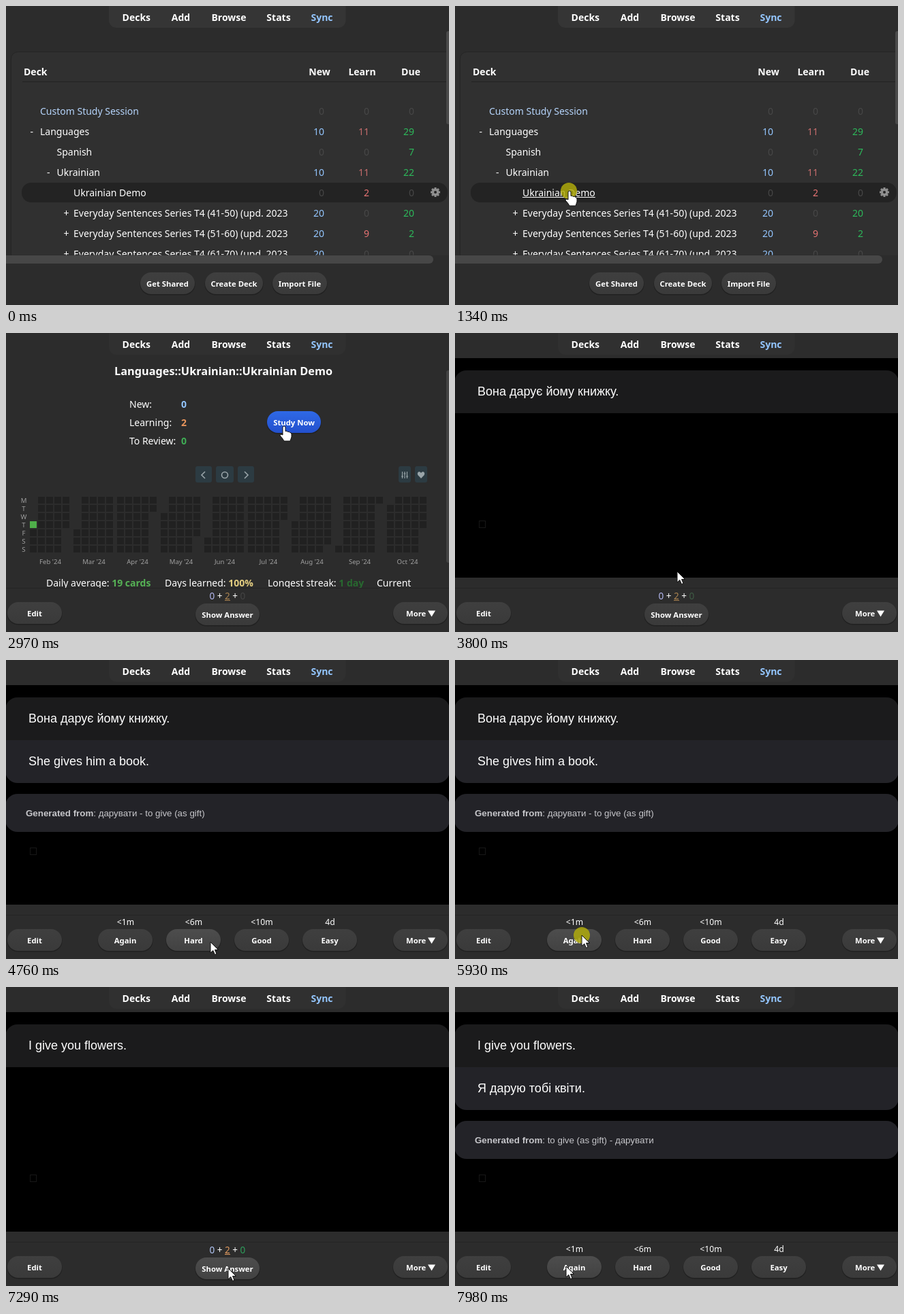
Animation of 650x440 px, one loop 8000 ms. Source, as an HTML page with a canvas:

```html
<!DOCTYPE html>
<html lang="en">
<head>
<meta charset="utf-8">
<title>Flashcard review</title>
<style>
  html, body { margin: 0; height: 100%; overflow: hidden; background: #2c2c2c; }
  canvas { display: block; }
</style>
</head>
<body>
<canvas id="stage" width="650" height="440"></canvas>
<script>
const g = document.getElementById('stage').getContext('2d');
const LOOP = 8000, STEP = 70;
const ui = (size, weight = 400) => `${weight} ${size}px "Noto Sans", "Open Sans", sans-serif`;
const arial = (size, weight = 400) => `${weight} ${size}px "Liberation Sans", Arial, sans-serif`;
const BODY = ui(14), BOLD = ui(14, 700), BUTTON = ui(11.3, 700);
const WHITE = '#fff', BLUE = '#93c5fd', RED = '#e57373', GREEN = '#2db85a', DIM = '#474747', BG = '#2c2c2c';

// Pointer moves: [start, steps, x, y]
const moves = [
  [120, 10, 167, 272], [1940, 10, 407, 137], [3520, 8, 301, 416], [4280, 2, 300, 415],
  [5040, 5, 187, 405], [5530, 1, 186, 405], [6260, 7, 323, 412], [6750, 2, 326, 414],
  [7430, 8, 165, 411], [7980, 1, 163, 411]
];
const clicks = [[1340, 1480], [2760, 2900], [4550, 4690], [5930, 6060], [7150, 7290]];
const cards = [
  { front: 'Вона дарує йому книжку.', back: 'She gives him a book.', note: 'дарувати - to give (as gift)',
    counts: ['#b4b8f0', '#ab8350', '#3f5c45'] },
  { front: 'I give you flowers.', back: 'Я дарую тобі квіти.', note: 'to give (as gift) - дарувати',
    counts: ['#b4c8f8', '#e09a60', '#2f9f5c'] }
];
// [name, indent, toggle, new, learn, due]
const decks = [
  ['Custom Study Session', 50, '', 0, 0, 0],
  ['Languages', 50, '-', 10, 11, 29],
  ['Spanish', 74.5, '', 0, 0, 7],
  ['Ukrainian', 74.5, '-', 10, 11, 22],
  ['Ukrainian Demo', 99, '', 0, 2, 0],
  ...['41-50', '51-60', '61-70'].map((part, i) =>
    [`Everyday Sentences Series T4 (${part}) (upd. 2023)`, 99, '+', 20, [0, 9, 0][i], [20, 2, 0][i]])
];

let pointer, hand;
const inside = (x, y, w, h) =>
  pointer && pointer.x >= x && pointer.x <= x + w && pointer.y >= y && pointer.y <= y + h;

function pointerAt(t) {
  if (t < moves[0][0]) return null;
  let x = 530, y = 416;
  for (const [start, steps, toX, toY] of moves) {
    if (t < start) break;
    const u = Math.min(1, (Math.floor((t - start) / STEP) + 1) / steps) ** 0.8;
    const e = u * u * (3 - 2 * u);
    x += (toX - x) * e;
    y += (toY - y) * e;
  }
  return { x: Math.round(x), y: Math.round(y) };
}

function text(str, x, y, color = WHITE, font = BODY, align = 'left') {
  g.font = font;
  g.fillStyle = color;
  g.textAlign = align;
  g.fillText(str, x, y);
  return g.measureText(str).width;
}

function runs(pieces, x, y) {
  for (const [str, color, font] of pieces) x += text(str, x, y, color, font);
}

function rect(x, y, w, h, color) {
  g.fillStyle = color;
  g.fillRect(x, y, w, h);
}

function box(x, y, w, h, radius, fill, stroke) {
  g.beginPath();
  g.roundRect(x, y, w, h, radius);
  g.fillStyle = fill;
  g.fill();
  if (stroke) { g.strokeStyle = stroke; g.lineWidth = 1; g.stroke(); }
}

function button(label, x, y, w, shades) {
  const [top, bottom] = shades || (inside(x, y, w, 32) ? ['#4d4d4d', '#424242'] : ['#3f3f3f', '#3a3a3a']);
  const fill = g.createLinearGradient(0, y, 0, y + 32);
  fill.addColorStop(0, top);
  fill.addColorStop(1, bottom);
  box(x - 0.5, y + 1, w + 1, 32.5, 16, '#212121');
  box(x, y, w, 32, 16, fill);
  text(label, x + w / 2, y + 20.5, WHITE, BUTTON, 'center');
}

function gear(x, y) {
  g.strokeStyle = '#8f8f8f';
  g.lineWidth = 3;
  g.beginPath();
  for (let i = 0; i < 8; i++) {
    const c = Math.cos(i * Math.PI / 4), s = Math.sin(i * Math.PI / 4);
    g.moveTo(x + c * 4, y + s * 4);
    g.lineTo(x + c * 7, y + s * 7);
  }
  g.stroke();
  g.lineWidth = 3.4;
  g.beginPath();
  g.arc(x, y, 3.7, 0, 7);
  g.stroke();
}

function toolbar(bright) {
  box(151, -12, 347.5, 44, 11, bright ? '#353535' : '#303030');
  [['Decks', 191.3], ['Add', 256.5], ['Browse', 327], ['Stats', 400], ['Sync', 463.5]].forEach(([label, x]) =>
    text(label, x, 22, label === 'Sync' ? BLUE : WHITE, BOLD, 'center'));
}

function deckRow([name, x, toggle, ...counts], i) {
  const y = 160 + i * 30, current = i === 4;
  if (current) box(23, 260, 625, 29, 14, '#232323');
  if (current || inside(23, y - 20, 627, 29)) gear(630, y - 6);
  if (toggle) text(toggle, x - 14.5, y);
  g.save();
  g.beginPath();
  g.rect(0, 0, 413, 440);
  g.clip();
  const color = i ? WHITE : '#b5d4fb', width = text(name, x, y, color);
  if (inside(x, y - 15, Math.min(width, 413 - x), 20)) {
    rect(x, y + 1, width, 1, color);
    hand = true;
  }
  g.restore();
  counts.forEach((n, k) => {
    const color = n ? [BLUE, n === 11 ? '#c76d6d' : RED, GREEN][k] : DIM;
    text(n, 467 + 66 * k, y, color, BODY, 'right');
  });
}

function deckList() {
  g.save();
  g.beginPath();
  g.rect(0, 37, 650, 329.5);
  g.clip();
  box(7.5, 67.5, 670, 400, 10, '#303030', '#252525');
  text('Deck', 26, 102, WHITE, BOLD);
  [['New', 460], ['Learn', 522.5], ['Due', 594]].forEach(([label, x]) => text(label, x, 102, WHITE, BOLD, 'center'));
  rect(24, 111, 624, 1, '#222');
  decks.forEach(deckRow);
  box(646, 37, 8, 137, 3, '#4a4a4a');
  g.restore();
  box(-10, 367, 637, 12, 6, '#474747');
  button('Get Shared', 197, 392, 80);
  button('Create Deck', 292, 392, 85);
  button('Import File', 391, 392, 80);
}

function heatmap() {
  [...'MTWTFSS'].forEach((day, i) => text(day, 26, 249.5 + i * 12, '#a0a0a0', ui(9.6), 'center'));
  let left = 35;
  for (let month = 1; month <= 9; month++) {
    const first = (new Date(2024, month, 1).getDay() + 6) % 7;
    const days = new Date(2024, month + 1, 0).getDate();
    const columns = Math.ceil((first + days) / 7);
    for (let d = first; d < first + days; d++) {
      const today = month === 1 && d === first;
      rect(left + Math.floor(d / 7) * 12, 241 + d % 7 * 12, 10, 10, today ? '#4fae4a' : '#212121');
    }
    const label = ['Feb', 'Mar', 'Apr', 'May', 'Jun', 'Jul', 'Aug', 'Sep', 'Oct'][month - 1];
    text(`${label} '24`, left + columns * 6, 340, '#a0a0a0', ui(9.6), 'center');
    left += columns * 12 + 4;
  }
}

function heatmapButtons() {
  [[278, 24], [308, 26], [340, 24], [576, 18], [600, 18]].forEach(([x, w]) => box(x, 196, w, 24, 3, '#2c3b42'));
  g.strokeStyle = g.fillStyle = '#9aa5a9';
  g.lineWidth = 1.6;
  g.stroke(new Path2D('M292 204l-5 5 5 5M350 204l5 5-5 5M325.5 209a4.5 4.5 0 1 1-9 0a4.5 4.5 0 1 1 9 0'));
  g.lineWidth = 1.1;
  g.stroke(new Path2D('M581.5 204v10M585 204v10M588.5 204v10M580 211h3M583.5 207h3M587 211h3'));
  g.fill(new Path2D('M609 214l-4.5-4.7C602 205 607 202.5 609 206C611 202.5 616 205 613.5 209.3Z'));
}

function overview() {
  text('Languages::Ukrainian::Ukrainian Demo', 319, 62, WHITE, ui(16.3, 700), 'center');
  [['New:', 0, BLUE], ['Learning:', 2, '#e8955c'], ['To Review:', 0, '#3fae55']].forEach(([label, n, color], i) => {
    text(label, 181, 110 + i * 27);
    text(n, 257, 110 + i * 27, color, BOLD);
  });
  const over = inside(383, 115, 79, 32);
  button('Study Now', 383, 115, 79, over ? ['#2f69e6', '#2350cd'] : ['#3b7af0', '#2860e2']);
  hand = over || inside(35, 241, 582, 84) || inside(278, 196, 86, 24);
  heatmapButtons();
  heatmap();
  g.save();
  g.beginPath();
  g.rect(0, 340, 650, 35);
  g.clip();
  runs([['Daily average: '], ['19 cards', '#56b255', BOLD]], 59, 373);
  runs([['Days learned: '], ['100%', '#e3cd80', BOLD]], 233, 373);
  runs([['Longest streak: '], ['1 day', '#27692f', BOLD]], 384, 373);
  text('Current', 544, 373);
  g.restore();
  box(646, 55, 8, 283, 3, '#434343');
}

function overviewBar() {
  rect(0, 375, 650, 1, '#222');
  button('Options', 196, 392, 66);
  button('Custom Study', 276, 392, 96);
  button('Description', 386, 392, 86);
}

function reviewBar(counts, answered) {
  rect(0, 375, 650, 1, '#242424');
  button('Edit', 2, 396, 80);
  button('', 568, 396, 80);
  text('More', 587, 416.5, WHITE, BUTTON);
  g.fill(new Path2D('M619 408.5h11l-5.5 9z'));
  if (answered) {
    [['Again', '<1m'], ['Hard', '<6m'], ['Good', '<10m'], ['Easy', '4d']].forEach(([label, due], i) => {
      text(due, 175.5 + i * 100, 390, WHITE, ui(12.2), 'center');
      button(label, 135 + i * 100, 396, 80);
    });
  } else {
    const font = ui(13.5);
    runs([['0', counts[0], font], [' + ', WHITE, font], ['2', counts[1], font],
      [' + ', WHITE, font], ['0', counts[2], font]], 298.5, 392);
    rect(321, 393, 8, 1, counts[1]);
    button('Show Answer', 278, 398, 94);
  }
}

function review(card, answered) {
  rect(0, 37, 650, 323, '#000');
  box(-1, 55, 652, 63, [18, 18, 0, 0], '#1b1b1c');
  text(card.front, 33, 92, WHITE, arial(18));
  g.strokeStyle = '#171717';
  g.lineWidth = 1;
  g.strokeRect(35.5, 276.5, 9, 10);
  if (answered) {
    box(-1, 118, 652, 63, [0, 0, 18, 18], '#232328');
    text(card.back, 33, 155, WHITE, arial(18));
    box(-1, 197, 652, 56, 18, '#232328');
    runs([['Generated from', '#c6c6ca', arial(13.33, 700)], [': ' + card.note, '#c6c6ca', arial(13.33)]], 29, 230);
  }
  reviewBar(card.counts, answered);
}

const arrowShape = new Path2D('M0 0V16L3.8 12.5L6.5 18.5L9 17.5L6.5 11.5H11.5Z');
const handShape = new Path2D('M-1 2Q-1 0 1 0T3 2V7.5Q5 6.5 6.5 8.5Q8.5 7.5 9.5 9.5Q12 9 12 12V16Q11 19 10 22H1Q-1 18-5 14Q-5 11-1 13Z');

function drawPointer(t) {
  if (!pointer) return;
  g.save();
  g.translate(pointer.x, pointer.y);
  if (clicks.some(([down, up]) => t >= down && t < up)) {
    g.beginPath();
    g.arc(0, 0, 12, 0, 7);
    g.fillStyle = 'rgba(176,172,12,.84)';
    g.fill();
  }
  const shape = hand ? handShape : arrowShape;
  g.fillStyle = '#fff';
  g.strokeStyle = '#111';
  g.lineWidth = 1;
  g.fill(shape);
  g.stroke(shape);
  g.restore();
}

function draw(t) {
  pointer = pointerAt(t);
  hand = false;
  rect(0, 0, 650, 440, BG);
  if (t < 1610) deckList();
  else if (t < 3040) {
    overview();
    if (t < 2970) overviewBar();
    else reviewBar(['#b4b8f0', '#ab8350', '#444'], false);
  } else if (t < 6190) review(cards[0], t >= 4760);
  else review(cards[1], t >= 7360);
  toolbar(t < 2900);
  drawPointer(t);
}

function tick() {
  draw(performance.now() % LOOP);
  requestAnimationFrame(tick);
}
tick();
</script>
</body>
</html>
```
